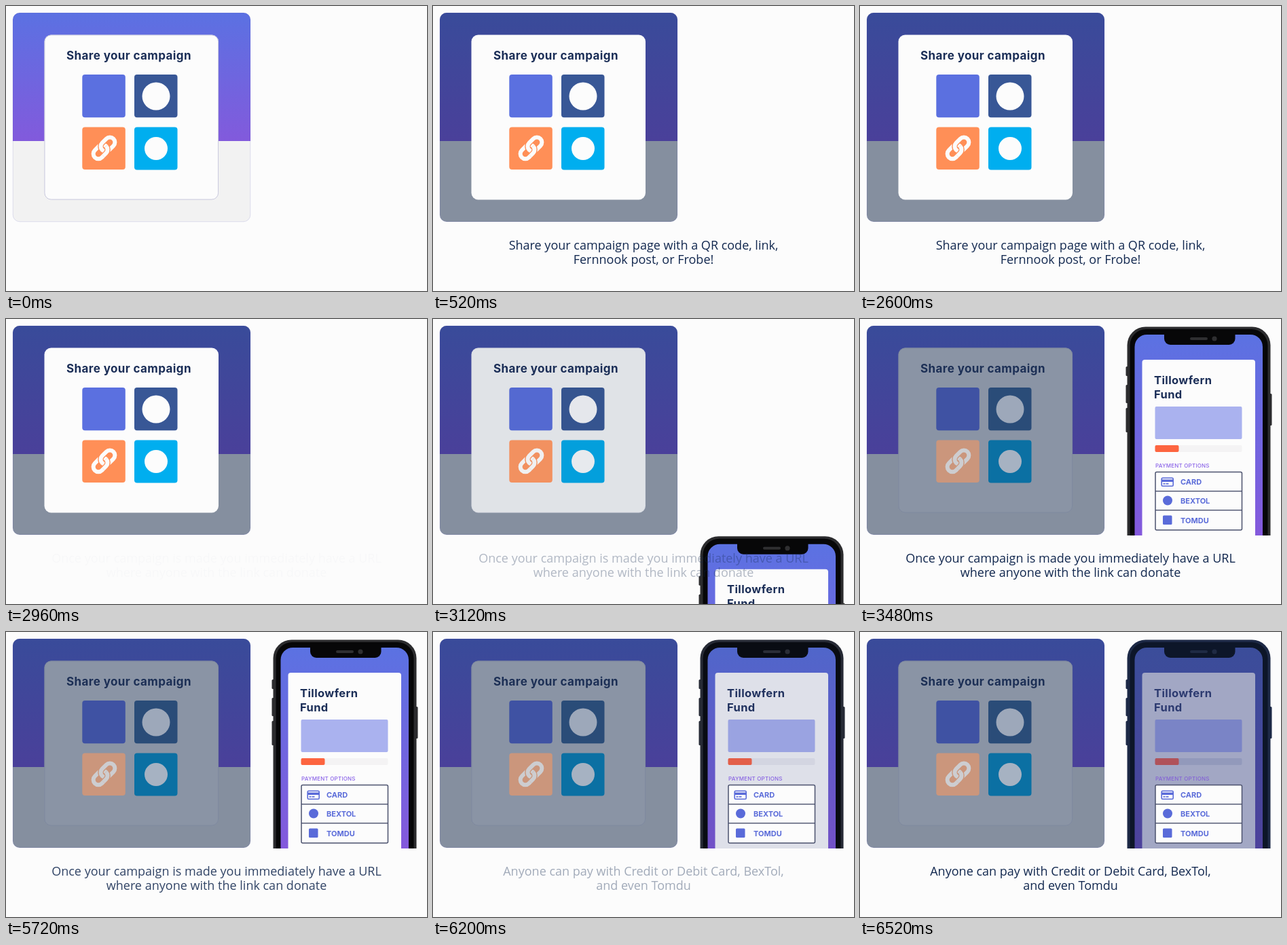
An HTML page with a canvas that plays this animation: 620 by 420 pixels, repeating every 8000 ms.

```html
<!DOCTYPE html>
<html lang="en">
<head>
<meta charset="utf-8">
<title>Share your campaign</title>
<style>
  html, body { margin: 0; width: 100%; height: 100%; overflow: hidden; background: #fcfcfc; }
  canvas { display: block; width: 100vw; height: 100vh; }
</style>
</head>
<body>
<canvas id="stage" width="620" height="420"></canvas>
<script>
const ctx = document.getElementById('stage').getContext('2d');
const LOOP = 8000;
const HEADING = 'Inter, sans-serif';

const CAPTIONS = [
  { lines: ['Share your campaign page with a QR code, link,', 'Fernnook post, or Frobe!'], show: [0, 520], hide: [2600, 2950] },
  { lines: ['Once your campaign is made you immediately have a URL', 'where anyone with the link can donate'], show: [2950, 3480], hide: [5680, 6000] },
  { lines: ['Anyone can pay with Credit or Debit Card, BexTol,', 'and even Tomdu'], show: [6000, 6520], hide: [8000, 8400] }
];

const ramp = (t, [from, to]) => Math.min(1, Math.max(0, (t - from) / (to - from)));
const ease = p => p * p * (3 - 2 * p);

// Blend two #rrggbb colours.
function mix(a, b, p) {
  const part = (hex, i) => parseInt(hex.slice(i, i + 2), 16);
  const blend = i => Math.round(part(a, i) + (part(b, i) - part(a, i)) * p);
  return `rgb(${blend(1)},${blend(3)},${blend(5)})`;
}

function box(x, y, w, h, r, fill, stroke, line = 1) {
  ctx.beginPath();
  ctx.roundRect(x, y, w, h, r);
  if (fill) { ctx.fillStyle = fill; ctx.fill(); }
  if (stroke) { ctx.strokeStyle = stroke; ctx.lineWidth = line; ctx.stroke(); }
}

function dot(x, y, r, fill) {
  ctx.beginPath();
  ctx.arc(x, y, r, 0, 2 * Math.PI);
  ctx.fillStyle = fill;
  ctx.fill();
}

function label(str, x, y, font, fill, spacing = 0, align = 'left') {
  ctx.font = font;
  ctx.letterSpacing = spacing + 'px';
  ctx.textAlign = align;
  ctx.fillStyle = fill;
  ctx.fillText(str, x, y);
}

function fade(y0, y1, top, bottom) {
  const g = ctx.createLinearGradient(0, y0, 0, y1);
  g.addColorStop(0, top);
  g.addColorStop(1, bottom);
  return g;
}

// Two interlocked rings; the second pass puts the lower ring on top on one side.
function chain(x, y, color, gap) {
  const R = 7.4, near = 3.4, far = 12;
  const ring = u => {
    const shape = [u - R, -R, far - near + 2 * R, 2 * R, R, null];
    box(...shape, gap, 8.6);
    box(...shape, color, 6);
  };
  ctx.save();
  ctx.translate(x, y);
  ctx.rotate(-Math.PI / 4);
  ring(-far);
  ring(near);
  ctx.beginPath();
  ctx.rect(-9, 0, 18, 14);
  ctx.clip();
  ring(-far);
  ctx.restore();
}

function drawPanel(back, front) {
  const tone = (a, b) => mix(a, b, front);
  ctx.save();
  ctx.beginPath();
  ctx.roundRect(10, 10, 350, 308, 10);
  ctx.clip();
  ctx.fillStyle = mix('#f2f2f2', '#858f9f', back);
  ctx.fillRect(10, 10, 350, 308);
  ctx.fillStyle = fade(10, 199, mix('#5b71e2', '#394b9a', back), mix('#825adc', '#4a409a', back));
  ctx.fillRect(10, 10, 350, 189);
  ctx.restore();
  box(10.2, 10.2, 349.6, 307.6, 10, null, 'rgba(80,80,190,.3)', 0.5);

  box(56.5, 42.5, 256.5, 243, 10, tone('#fcfcfc', '#8a94a5'));
  ctx.globalAlpha = Math.max(1 - back, front);
  box(56.9, 42.9, 255.7, 242.2, 9.6, null, tone('#b9b9d4', '#7b869e'), 0.8);
  ctx.globalAlpha = 1;
  label('Share your campaign', 89, 79, '700 17px ' + HEADING, tone('#1b2e57', '#1c2f55'), 0.4);

  const orange = tone('#ff8f57', '#cb967c');
  box(112.3, 101, 63.5, 63.3, 4, tone('#5b70e0', '#3f52a3'));
  box(189, 101, 63.5, 63.3, 4, tone('#385796', '#2a4c78'));
  box(112.3, 178.5, 63.5, 62.5, 4, orange);
  box(189, 178.5, 63.5, 63, 4, tone('#00aeef', '#0b70a3'));
  dot(221, 133, 20.5, tone('#fcfcfc', '#9da8ba'));
  dot(221, 210, 17, tone('#fcfcfc', '#a6b2c2'));
  chain(144.5, 209.3, tone('#fcfcfc', '#cdcdd0'), orange);
}

function drawOptions() {
  const blue = '#5a6bd9', line = '#4b526e';
  box(435, 225.5, 127.5, 85.5, 2, '#fcfcfc', line, 1.5);
  ctx.fillStyle = line;
  ctx.fillRect(435, 253, 127, 1.4);
  ctx.fillRect(435, 281, 127, 1.4);

  box(444.2, 234.2, 17, 12, 1.5, '#fcfcfc', blue, 1.6);
  ctx.fillStyle = blue;
  ctx.fillRect(444, 236.5, 17.5, 3.5);
  ctx.fillRect(446.5, 242, 3, 1.6);
  ctx.fillRect(450.5, 242, 4, 1.6);
  dot(453, 267.5, 7, blue);
  box(446, 289.5, 13.5, 13.5, 1.5, blue);
  ['CARD', 'BEXTOL', 'TOMDU'].forEach((name, i) =>
    label(name, 472, 244 + i * 28.3, '700 11px ' + HEADING, blue));
}

function drawPhone(shift, dim) {
  const tone = (a, b) => mix(a, b, dim);
  const shell = tone('#2c2c2e', '#1d2946');
  const body = tone('#070708', '#0d1629');
  ctx.save();
  ctx.translate(0, shift);
  ctx.beginPath();
  ctx.rect(385, 11, 230, 308);
  ctx.clip();

  for (const [y, h] of [[70, 14], [97, 27], [131, 36]]) box(391.5, y, 5, h, 1.5, shell);
  box(601.5, 110, 5, 47, 1.5, shell);
  box(393.5, 11.5, 211, 340, 27, shell);
  box(397.5, 15, 203, 340, 24, body);

  box(404.5, 23, 188.5, 330, 18, fade(23, 319, tone('#5b72e2', '#3b4d9a'), tone('#8459dc', '#4d429c')));
  box(448, 18, 104.5, 20, [0, 0, 9, 9], body);
  box(486, 27, 26, 4, 2, tone('#2f2f31', '#1f2a44'));
  dot(522, 29, 3.6, tone('#2f2f31', '#1f2a44'));

  box(415.5, 60, 166.5, 280, 4, tone('#fcfcfc', '#a2a7c4'));
  const title = tone('#1b2e57', '#2c3a70');
  label('Tillowfern', 433, 95.5, '700 16.5px ' + HEADING, title, 0.4);
  label('Fund', 433, 116.5, '700 16.5px ' + HEADING, title, 0.4);
  box(434.5, 129, 128, 48, 2, tone('#aab2ef', '#7a84c6'));
  box(434.5, 186, 128, 10, 2, tone('#f4f3f4', '#9299bb'));
  box(434.5, 186, 35, 10, 2, tone('#fd6540', '#b0525a'));
  label('PAYMENT OPTIONS', 435, 218.5, '500 8px ' + HEADING, tone('#8a63e8', '#8462d6'), 0.2);
  drawOptions();
  ctx.restore();
}

function drawCaption({ lines, show, hide }, t) {
  ctx.globalAlpha = ramp(t, show) * (1 - ramp(t, hide));
  lines.forEach((text, i) =>
    label(text, 310, 358.5 + i * 21.5, '400 18px "Open Sans", sans-serif', '#12284f', 0, 'center'));
  ctx.globalAlpha = 1;
}

function draw(t) {
  const [first, second, third] = CAPTIONS.map(c => ease(ramp(t, c.show)));
  ctx.fillStyle = '#fcfcfc';
  ctx.fillRect(0, 0, 620, 420);
  drawPanel(first, second);
  if (second > 0) drawPhone(409 * (1 - second), third);
  CAPTIONS.forEach(c => drawCaption(c, t));
}

const start = performance.now();
function tick() {
  draw((performance.now() - start) % LOOP);
  requestAnimationFrame(tick);
}
tick();
</script>
</body>
</html>
```
